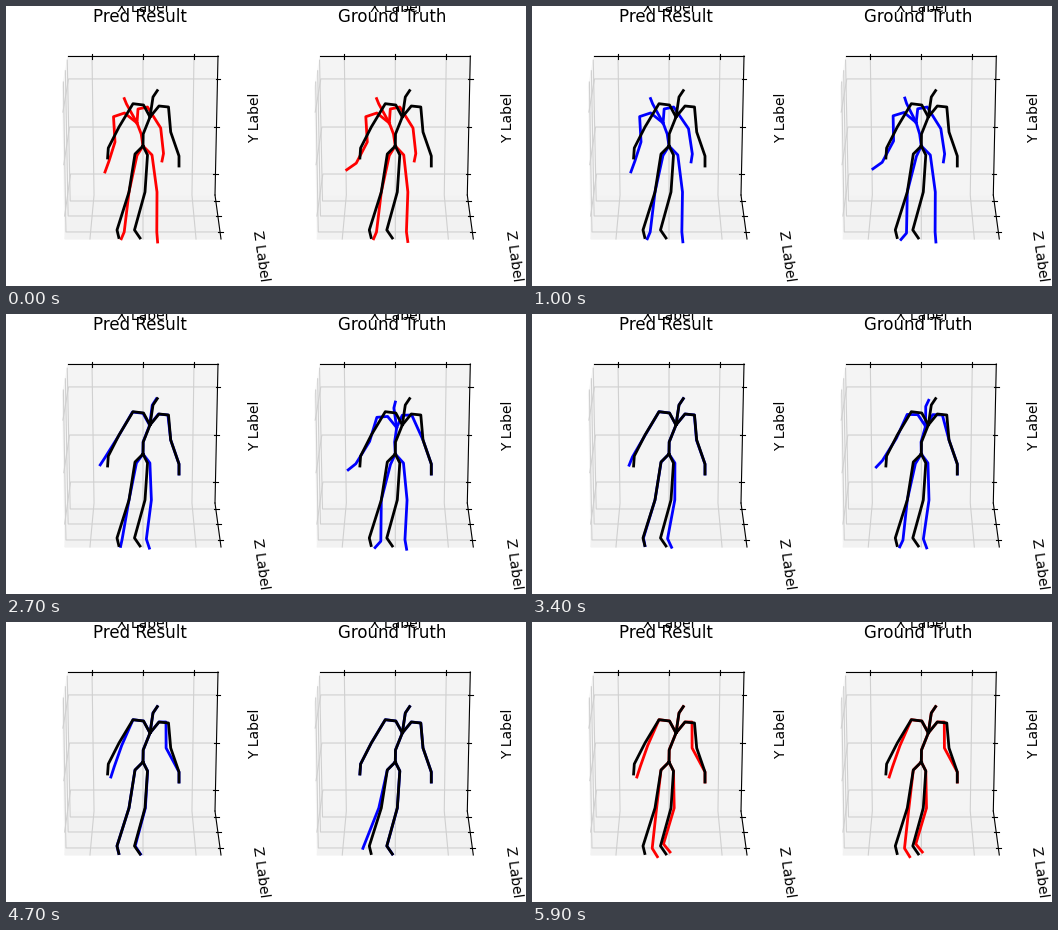
Animation of 520 by 280 pixels, one loop 6 s. Source, as a matplotlib script:

```python
import numpy as np
import matplotlib.pyplot as plt
from matplotlib.animation import FuncAnimation

W, H, DPI = 520, 280, 100
FRAMES, INTERVAL = 60, 100
BLUE_FROM, BLUE_TO = 10, 50
SHIFT = 252.3

plt.rcParams["font.family"] = "DejaVu Sans"

REST = dict(
    pelvis=(137, 140), spine=(137.2, 128), neck=(144, 111),
    head=(147, 91), crown=(151.3, 84.6),
    collar_l=(137.5, 99), shoulder_l=(127, 97.7), elbow_l=(113, 121),
    wrist_l=(102.3, 142), hand_l=(101.6, 152),
    collar_r=(153, 100), shoulder_r=(162.5, 101), elbow_r=(164.7, 126),
    wrist_r=(173, 150), hand_r=(173, 160),
    hip_l=(129, 148), knee_l=(123, 186), ankle_l=(111, 224), toe_l=(112.8, 231.5),
    hip_r=(141.5, 149), knee_r=(139, 186), ankle_r=(128.5, 224), toe_r=(134, 232),
)
CHAINS = [
    ("pelvis", "spine", "neck", "head", "crown"),
    ("neck", "collar_l", "shoulder_l", "elbow_l", "wrist_l", "hand_l"),
    ("neck", "collar_r", "shoulder_r", "elbow_r", "wrist_r", "hand_r"),
    ("pelvis", "hip_l", "knee_l", "ankle_l", "toe_l"),
    ("pelvis", "hip_r", "knee_r", "ankle_r", "toe_r"),
]

# Each move shifts a few joints away from the resting pose.
MOVES = dict(
    lean=dict(
        spine=(-2, 0), neck=(-13, 6), head=(-26.5, 7), crown=(-33, 8),
        collar_l=(-19, 8), shoulder_l=(-19.5, 13), elbow_l=(-4, 15),
        wrist_l=(0.7, 13), hand_l=(-2.6, 14),
        collar_r=(-21, 3), shoulder_r=(-21, 0)),
    reach=dict(wrist_l=(-3.5, 1.5), hand_l=(-7.3, -1.5)),
    arm=dict(elbow_r=(-10, -4), wrist_r=(-15.5, -2.5), hand_r=(-17, -5)),
    left_leg=dict(hip_l=(2, 1.5), ankle_l=(7.2, 2), toe_l=(2.5, 1.3)),
    right_leg=dict(hip_r=(4.5, 0), knee_r=(12, 0), ankle_r=(22.3, 2), toe_r=(17.6, 4)),
    step=dict(knee_l=(-2.5, 0), ankle_l=(-6.3, 2), toe_l=(-8.2, -5.2)),
    drop=dict(elbow_l=(2.7, 2.5), wrist_l=(6, 2.5), hand_l=(3.3, 3),
              shoulder_r=(-2.5, -1), elbow_r=(-4.6, 0)),
    settle=dict(knee_l=(1.6, 0), ankle_l=(9.2, 2.3), toe_l=(12.6, 3.2),
                knee_r=(3.2, 0), ankle_r=(3, -2), toe_r=(4, -2)),
)


def rise(t, start, end):
    u = np.clip((t - start) / (end - start), 0, 1)
    return u * u * (3 - 2 * u)


def fade(t, start, end):
    return 1 - rise(t, start, end)


def pred_weights(t):
    return dict(
        lean=fade(t, 9, 29),
        reach=rise(t, 9, 24) * fade(t, 27, 44),
        arm=fade(t, 4, 26),
        left_leg=fade(t, 22, 36),
        right_leg=fade(t, 4, 52),
        drop=rise(t, 32, 47),
        settle=rise(t, 47, 59),
    )


def true_weights(t):
    return dict(
        lean=fade(t, 3, 47),
        reach=1.45 * fade(t, 30, 47),
        arm=fade(t, 4, 26),
        left_leg=(1 + .6 * rise(t, 0, 12)) * fade(t, 27, 45),
        right_leg=(.88 + .12 * rise(t, 0, 10)) * fade(t, 19, 48),
        step=rise(t, 34, 47) * fade(t, 47, 59),
        drop=rise(t, 47, 59),
        settle=rise(t, 47, 59),
    )


def pose(weights):
    joints = {name: np.array(p, float) for name, p in REST.items()}
    for move, w in weights.items():
        for name, offset in MOVES[move].items():
            joints[name] += w * np.array(offset)
    return joints


fig = plt.figure(figsize=(W / DPI, H / DPI), dpi=DPI, facecolor="white")
ax = fig.add_axes([0, 0, 1, 1])
ax.set_xlim(0, W)
ax.set_ylim(H, 0)
ax.axis("off")

# Box corners: far wall, then the near edges of the left wall and the floor.
FAR_TL, FAR_TR, FAR_BL, FAR_BR = np.array(
    [(62, 50), (212, 50), (65, 189), (209, 189)], float)
NEAR_TL, NEAR_BL, NEAR_BR = np.array([(56.5, 81), (59, 233), (215, 233)], float)


def mix(a, b, u):
    return a + (b - a) * u


def line(dx, points, color, width, **kw):
    x, y = np.array(points).T
    return ax.plot(x + dx, y, color=color, lw=width, **kw)[0]


def draw_box(dx):
    walls = [((FAR_TL, FAR_BL, NEAR_BL, NEAR_TL), "#f6f6f6"),
             ((FAR_BL, FAR_BR, NEAR_BR, NEAR_BL), "#f2f2f2"),
             ((FAR_TL, FAR_TR, FAR_BR, FAR_BL), "#f4f4f4")]
    for corners, color in walls:
        ax.fill(*(np.array(corners) + (dx, 0)).T, fc=color, ec=color, lw=.8)

    grid = dict(color="#d0d0d0", width=.8, snap=False, zorder=2)
    edge = dict(color="black", width=.8, zorder=3)
    for u in (.16, .5, .84):
        top = mix(FAR_TL, FAR_TR, u)
        line(dx, [top, mix(FAR_BL, FAR_BR, u), mix(NEAR_BL, NEAR_BR, u)], **grid)
        line(dx, [top - (0, 2.5), top + (0, 2.5)], **edge)
    for u in (.165, .511, .849):
        right = mix(FAR_TR, FAR_BR, u)
        line(dx, [mix(NEAR_TL, NEAR_BL, u), mix(FAR_TL, FAR_BL, u), right], **grid)
        line(dx, [right - (2, 0), right + (2.7, 0)], **edge)
    for u in (.136, .477, .84):
        right = mix(FAR_BR, NEAR_BR, u)
        line(dx, [mix(FAR_TL, NEAR_TL, u), mix(FAR_BL, NEAR_BL, u), right], **grid)
        line(dx, [right - (2, 0), right + (2.7, 0)], **edge)
    for ends in ((FAR_TL, FAR_TR), (FAR_TR, FAR_BR), (FAR_BR, NEAR_BR)):
        line(dx, ends, **edge)


def label(x, y, text, size=10, angle=0):
    ax.text(x, y, text, fontsize=size, rotation=angle, rotation_mode="anchor",
            ha="center", va="baseline", zorder=8)


def draw_panel(dx, title):
    draw_box(dx)
    label(dx + 134.2, 16.5, title, 12)
    label(dx + 137, 6.5, "X Label")
    label(dx + 253.3, 111.5, "Y Label", angle=90)
    label(dx + 250.8, 250.3, "Z Label", angle=-82)
    for chain in CHAINS:
        line(dx, [REST[j] for j in chain], "black", 2, zorder=6)
    return [line(dx, [REST[j] for j in chain], "red", 2, zorder=5) for chain in CHAINS]


panels = [
    (0, draw_panel(0, "Pred Result"), pred_weights),
    (SHIFT, draw_panel(SHIFT, "Ground Truth"), true_weights),
]


def update(i):
    color = "blue" if BLUE_FROM <= i < BLUE_TO else "red"
    for dx, bones, weights in panels:
        joints = pose(weights(i))
        for bone, chain in zip(bones, CHAINS):
            x, y = np.array([joints[j] for j in chain]).T
            bone.set_data(x + dx, y)
            bone.set_color(color)
    return [bone for panel in panels for bone in panel[1]]


anim = FuncAnimation(fig, update, frames=FRAMES, interval=INTERVAL,
                     repeat=True, repeat_delay=0, blit=False)
plt.show()
```
